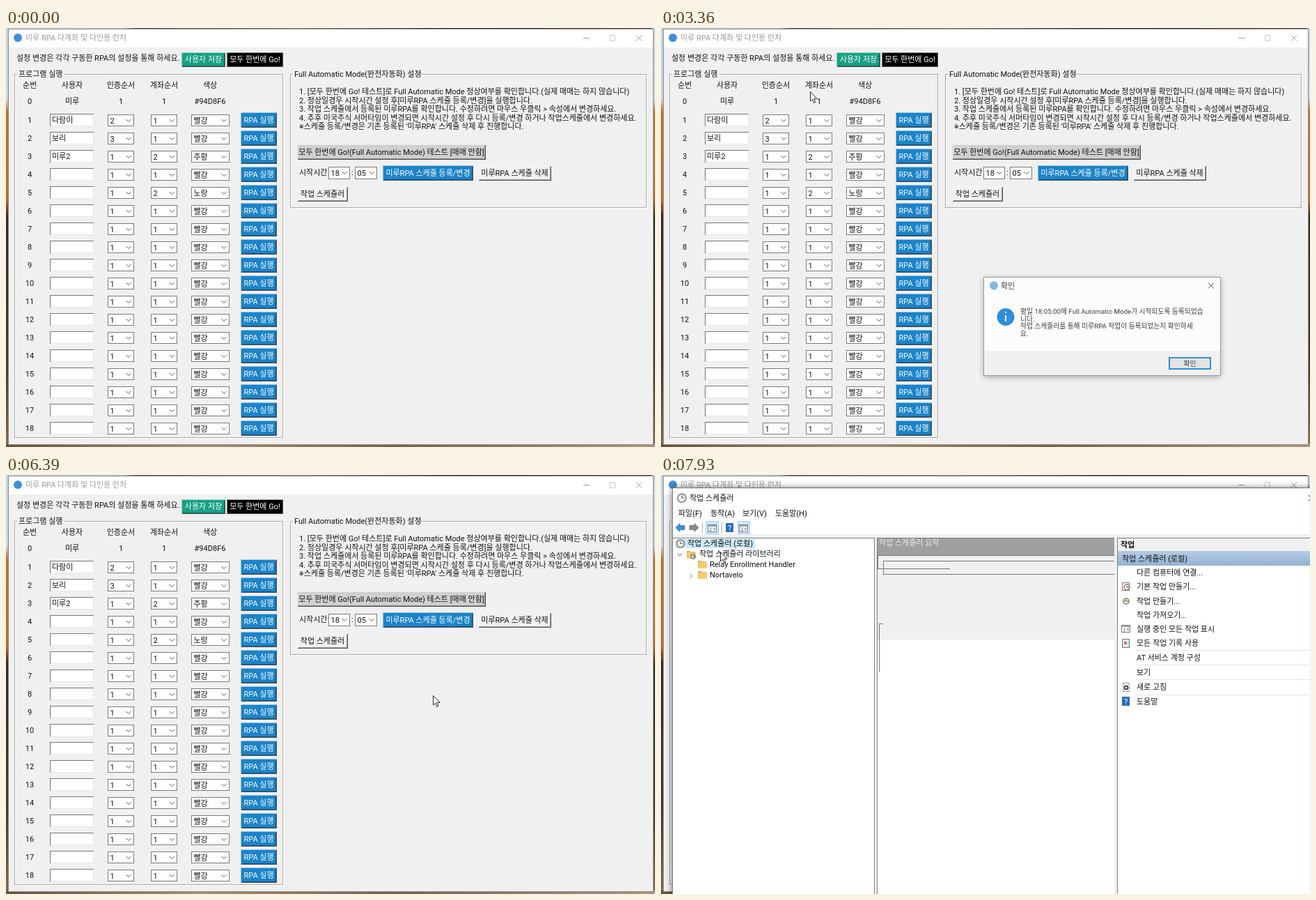
An HTML page that plays this animation: 932 px wide and 601 px high, repeating every 7990 ms.

```html
<!DOCTYPE html>
<html lang="ko">
<head>
<meta charset="utf-8">
<title>런처</title>
<style>
  html, body { margin: 0; width: 100%; height: 100%; overflow: hidden; background: #f0f0f0; }
  svg { display: block; }
  text { font: 11px Roboto, "Noto Sans CJK KR", sans-serif; fill: #111; white-space: pre; }
  rect, .crisp { shape-rendering: crispEdges; }
  #caption text { fill: currentColor; }
  #dialog text { font-size: 9.75px; }
</style>
</head>
<body>
<svg id="stage" width="932" height="601" viewBox="0 0 932 601"></svg>
<script>
const LOOP = 7990;
const BLUE = '#1b84ca', FACE = '#f0f0f0', ACCENT = '#0078d7';

const rect = (x, y, w, h, fill, more = '') => `<rect x="${x}" y="${y}" width="${w}" height="${h}" fill="${fill}" ${more}/>`;
const frame = (x, y, w, h, stroke, fill = 'none') =>
  rect(x + .5, y + .5, w - 1, h - 1, fill, `stroke="${stroke}"`);
const line = (d, stroke = '#444', more = 'class="crisp"') => `<path d="${d}" fill="none" style="stroke:${stroke}" ${more}/>`;
const dot = (x, y, r, fill, more = '') => `<circle cx="${x}" cy="${y}" r="${r}" fill="${fill}" ${more}/>`;
const label = (x, y, s, more = '') => `<text x="${x}" y="${y}" ${more}>${s}</text>`;
const center = (x, y, s, fill = '#111') => label(x, y, s, `text-anchor="middle" style="fill:${fill}"`);
const group = (id, ...parts) => `<g id="${id}">${parts.join('')}</g>`;
const chevron = (x, y) => line(`M${x - 3.5} ${y - 1.5}l3.5 3.5l3.5 -3.5`, '#555', '');
const cross = (x, y, r, stroke) => line(`M${x - r} ${y - r}l${2 * r} ${2 * r}m0 ${-2 * r}l${-2 * r} ${2 * r}`, stroke, '');

function bevel(x, y, w, h, fill, light, dark) {
  const l = x + .5, t = y + .5, r = x + w - .5, b = y + h - .5;
  return rect(x, y, w, h, fill) + line(`M${l} ${b}V${t}H${r}`, light) + line(`M${l} ${b}H${r}V${t}`, dark);
}
function button(x, y, w, h, s, fill = FACE, ink = '#111') {
  return bevel(x, y, w, h, fill, `color-mix(in srgb, ${fill}, white)`, '#555') +
    line(`M${x + 1.5} ${y + h - 1.5}H${x + w - 1.5}V${y + 1.5}`, `color-mix(in srgb, ${fill} 65%, black)`) +
    center(x + w / 2, y + h / 2 + 3.5, s, ink);
}
const combo = (x, y, w, s, h = 17) =>
  frame(x, y - 8, w, h, '#7a7a7a', '#fff') + label(x + 3.5, y + 4.5, s) + chevron(x + w - 8, y + .5);
function fieldset(x, y, w, h, s, gap) {
  return frame(x + 1, y + 1, w, h, '#fff') + frame(x, y, w, h, '#a8a8a8') +
    rect(x + 4, y - 3, gap, 8, FACE) + label(x + 6, y + 4, s);
}
function gradient(id, vertical, ...stops) {
  return `<linearGradient id="${id}" ${vertical ? 'x2="0" y2="1"' : ''}>` +
    stops.map(([o, c]) => `<stop offset="${o}" stop-color="${c}"/>`).join('') + '</linearGradient>';
}

function wallpaper() {
  return gradient('sky', 0, [0, '#c5d8e6'], [.18, '#b4c8d6'], [.2, '#5b4a38'], [.45, '#93866f'], [.7, '#2d2118'], [1, '#6a4a30']) +
    gradient('side', 1, [0, '#bcd3e6'], [.17, '#c9d6dc'], [.2, '#d06a20'], [.41, '#c8641e'], [.45, '#3a2a1c'], [.8, '#4b3826'], [1, '#8a6a48']) +
    gradient('ground', 0, [0, '#6b5138'], [.3, '#a98d6c'], [.6, '#7a6048'], [1, '#b09476']) +
    rect(0, 0, 932, 3, 'url(#sky)') + rect(0, 0, 5, 601, 'url(#side)') +
    rect(928, 0, 4, 601, 'url(#side)') + rect(0, 596, 932, 5, 'url(#ground)');
}

function caption() {
  return group('caption',
    label(28, 18, '미루 RPA 다계좌 및 다인용 런처'),
    line('M829 14.5h9', 'currentColor'),
    frame(867, 10, 8, 9, '#ccc'),
    cross(909, 14.5, 4, 'currentColor'));
}

function userRows() {
  const users = { 1: '다람이', 2: '보리', 3: '미루2' };
  const auth = { 1: 2, 2: 3 }, account = { 3: 2, 5: 2 }, color = { 3: '주황', 5: '노랑' };
  let out = '';
  for (let n = 1; n <= 18; n++) {
    const y = 106 + 26 * n;
    out += center(34, y + 4, n) +
      bevel(63, y - 9, 63, 18, '#fff', '#777', '#e8e8e8') + label(66, y + 4, users[n] || '') +
      combo(146, y, 38, auth[n] || 1) + combo(208, y, 38, account[n] || 1) +
      combo(266, y, 55, color[n] || '빨강') +
      button(337, y - 11, 52, 22, 'RPA 실행', BLUE, '#fff');
  }
  return out;
}

function launcher() {
  const notes = [
    '1. [모두 한번에 Go! 테스트]로 Full Automatic Mode 정상여부를 확인합니다.(실제 매매는 하지 않습니다)',
    '2. 정상일경우 시작시간 설정 후[미루RPA 스케줄 등록/변경]을 실행합니다.',
    '3. 작업 스케줄에서 등록된 미루RPA를 확인합니다. 수정하려면 마우스 우클릭 &gt; 속성에서 변경하세요.',
    '4. 추후 미국주식 서머타임이 변경되면 시작시간 설정 후 다시 등록/변경 하거나 작업스케줄에서 변경하세요.',
    "※스케줄 등록/변경은 기존 등록된 '미루RPA' 스케줄 삭제 후 진행합니다."];
  const columns = [[34, '순번', '0'], [95, '사용자', '미루'], [165, '인증순서', '1'], [227, '계좌순서', '1'], [293, '색상', '#94D8F6']];
  return rect(4, 2, 925, 595, FACE) + rect(4, 2, 925, 26, '#fff') +
    frame(3, 1, 927, 597, '#8a8a8a') +
    dot(17, 14, 6, '#3f8fdc') + caption() +
    label(15, 47, '설정 변경은 각각 구동한 RPA의 설정을 통해 하세요.') +
    button(252, 35, 63, 21, '사용자 저장', '#16a085', '#fff') +
    button(317, 35, 81, 21, '모두 한번에 Go!', '#000', '#fff') +
    fieldset(12, 66, 386, 522, '프로그램 실행', 68) +
    columns.map(([x, head, first]) => center(x, 86, head) + center(x, 109, first)).join('') +
    userRows() +
    group('focus', frame(208, 175, 38, 17, ACCENT), rect(210, 177, 19, 13, ACCENT),
      label(211.5, 188.5, '2', 'style="fill:#fff"')) +
    fieldset(408, 66, 512, 192, 'Full Automatic Mode(완전자동화) 설정', 178) +
    notes.map((s, i) => label(421, 95 + 12.5 * i, s)).join('') +
    button(418, 167, 271, 22, '모두 한번에 Go!(Full Automatic Mode) 테스트 [매매 안함]', '#d0d0d0') +
    label(421, 211, '시작시간') + combo(463, 207, 31, '18', 18) + label(496, 211, ':') + combo(501, 207, 32, '05', 18) +
    button(541, 197, 130, 22, '미루RPA 스케줄 등록/변경', BLUE, '#fff') +
    group('pressed', bevel(541, 197, 130, 22, FACE, '#696969', '#fff'), center(606.5, 212, '미루RPA 스케줄 등록/변경')) +
    button(678, 197, 105, 22, '미루RPA 스케줄 삭제') +
    button(418, 227, 73, 22, '작업 스케줄러');
}

function dialog() {
  const lines = ['평일 18:05:00에 Full Automatic Mode가 시작되도록 등록되었습', '니다.',
    '작업 스케줄러를 통해 미루RPA 작업이 등록되었는지 확인하세', '요.'];
  return group('dialog',
    rect(464, 358, 339, 140, '#fff', 'style="filter:drop-shadow(0 2px 4px #0007)"'),
    rect(464, 463, 339, 35, FACE), frame(463, 357, 341, 142, '#888'),
    dot(478, 369.5, 6, '#6aa9e4'),
    label(488, 373.5, '확인', 'style="font-size:11px"'), cross(790, 369.5, 4, '#222'),
    dot(495, 414.5, 12.5, ACCENT),
    rect(494, 412, 2, 9, '#fff'), rect(494, 407, 2, 2, '#fff'),
    lines.map((s, i) => label(516, 410 + 10.6 * i, s)).join(''),
    rect(730, 473, 59, 16, '#e1e1e1', `stroke="${ACCENT}" stroke-width="2"`),
    center(759.5, 484.5, '확인'));
}

const clock = (x, y, r) => dot(x, y, r, '#f4f1ea', 'stroke="#777" stroke-width="1.5"') + line(`M${x} ${y - r + 2}V${y}h3`, '#555', '');
const folder = (x, y) => rect(x, y, 5, 3, '#d9a93c') + rect(x, y + 1, 12, 9, '#f3cd6b', 'stroke="#dcae4d" stroke-width=".6"');
const help = (x, y) => rect(x, y, 11, 13, '#2a6dbb') + center(x + 5.5, y + 10.5, '?', '#fff');
const paneIcon = (x, y) => frame(x, y, 13, 11, '#777', '#fff') + rect(x + 1, y + 1, 11, 2, '#9ab') +
  line(`M${x + 4.5} ${y + 4}v6m3 -5h3m-3 2h3`, '#678');
const arrow = (x, dir, fill) => `<path d="M${x} 75.5l${6 * dir} -6v3h${7 * dir}v6h${-7 * dir}v3z" fill="${fill}" stroke="#456" stroke-width=".6"/>`;

function actions() {
  const items = [[144, '다른 컴퓨터에 연결...'], [164, '기본 작업 만들기...'], [184.5, '작업 만들기...'], [204.5, '작업 가져오기...'],
    [224.5, '실행 중인 모든 작업 표시'], [245, '모든 작업 기록 사용'], [265.5, 'AT 서비스 계정 구성'], [286.5, '보기'],
    [307.5, '새로 고침'], [328.5, '도움말']];
  return group('actions',
    rect(656, 91, 276, 18, FACE), label(660, 104, '작업', 'style="font-weight:600"'),
    gradient('bar', 1, [0, '#b5cbe3'], [1, '#93b1d2']), rect(656, 109, 276, 21, 'url(#bar)'),
    label(662, 124, '작업 스케줄러 (로컬)'),
    items.map(([y, s]) => label(683, y, s)).join(''),
    [251, 272, 293, 315].map(y => line(`M682 ${y + .5}H932`, '#e4e4e4')).join(''),
    frame(662, 154, 11, 12, '#a66', '#fff'), clock(669, 161, 4),
    clock(668, 181, 4), dot(665, 180, 2, '#e8953a'),
    paneIcon(661, 215),
    frame(662, 235, 11, 13, '#57779b', '#dfe9f5'), rect(665, 239, 4, 4, '#d9823c'),
    frame(663, 298, 10, 13, '#999', '#fff'), dot(668, 305, 2.5, 'none', 'stroke="#222" stroke-width="1.5"'),
    help(662, 318));
}

function scheduler() {
  const menu = [[25, '파일(F)'], [71, '동작(A)'], [117, '보기(V)'], [164, '도움말(H)']];
  return group('scheduler',
    rect(16, 18, 930, 600, '#fff', 'style="filter:drop-shadow(0 0 4px #0008)"'),
    line('M16.5 601V18.5H932', '#777'),
    clock(30, 33, 6), label(41, 37, '작업 스케줄러'), cross(934, 33, 4, '#222'),
    menu.map(([x, s]) => label(x, 59, s)).join(''),
    group('panes',
      rect(17, 85, 915, 6, FACE), rect(306, 90, 5, 511, FACE), rect(651, 90, 5, 511, FACE),
      line('M17 90.5H306.5V601M310.5 601V90.5H651M655.5 601V90.5H932', '#7d7d7d'),
      rect(311, 91, 340, 24, '#9f9f9f'), label(313, 101, '작업 스케줄러 요약', 'style="fill:#eee"'),
      rect(311, 115, 340, 121, FACE), line('M311 115.5H651', '#777')),
    actions(),
    group('tree',
      arrow(21, 1, '#2f93dd'), arrow(54, -1, '#8a8a8a'),
      line('M59.5 68v15M87.5 68v15', '#aaa'),
      frame(64, 66, 19, 19, '#99d1ff', '#cce8ff'), paneIcon(67, 71),
      help(93, 69),
      frame(110, 66, 18, 19, '#99d1ff', '#cce8ff'), paneIcon(112, 71),
      rect(21, 92, 114, 13, '#cce8ff'), clock(28, 98.5, 5.5), label(38, 102, '작업 스케줄러 (로컬)'),
      chevron(27, 114), folder(37, 109), clock(46, 117, 3), label(55, 117, '작업 스케줄러 라이브러리'),
      folder(53, 123), label(70, 132, 'Relay Enrollment Handler'),
      line('M41.5 141.5l3.5 3.5l-3.5 3.5', '#888', ''), folder(53, 138), label(70, 147, 'Nortavelo')),
    group('summary',
      line('M651 123.5H319.5V142.5H651M311.5 116V134.5H415M319 213.5H313.5V283', '#777')));
}

const stage = document.getElementById('stage');
stage.innerHTML = wallpaper() + launcher() + dialog() + group('veil', rect(0, 0, 932, 601, '#fff')) + scheduler() +
  group('cursor', '<path d="M.5 .5V14L3.6 11.2L5.7 16.2L7.8 15.3L5.7 10.4H10Z" fill="#fff" stroke="#111" stroke-width=".9"/>');
const part = id => document.getElementById(id);
const show = (id, on) => part(id).style.display = on ? '' : 'none';

// time, x, y
const route = [[340, 897, 595], [950, 610, 214], [1830, 610, 214], [1950, 395, 10], [2020, 237, 80],
  [2440, 237, 80], [2760, 424, 207], [3030, 153, 31], [3290, 153, 31], [3360, 214, 91], [3430, 214, 91],
  [3970, 620, 383], [4040, 620, 383], [4600, 780, 466], [4800, 757, 479], [5610, 757, 479], [5860, 609, 320],
  [6200, 609, 320], [6520, 616, 314], [6790, 616, 314], [6860, 607, 320], [7200, 607, 320], [7790, 96, 122],
  [7860, 90, 116], [7930, 85, 110]];
const opening = [[3250, 0], [3360, .8], [3430, .92], [3500, 1], [5220, 1], [5330, .27], [5390, 0]];
const fading = [[7000, 0], [7120, .5], [7230, 1]];

function sample(keys, t, column = 1) {
  const i = keys.findIndex(k => k[0] > t);
  if (i === 0) return keys[0][column];
  if (i < 0) return keys[keys.length - 1][column];
  const a = keys[i - 1], b = keys[i];
  return a[column] + (b[column] - a[column]) * (t - a[0]) / (b[0] - a[0]);
}

function draw() {
  const t = performance.now() % LOOP;
  const active = (t >= 1150 && t < 3180) || (t >= 5260 && t < 6200);
  part('caption').style.color = active ? '#000' : '#999';
  show('focus', active);
  show('pressed', t >= 1150 && t < 3180);

  const alpha = sample(opening, t);
  const scale = t > 5000 ? .968 + .032 * alpha : .975 + .025 * Math.min(1, alpha / .8);
  show('dialog', alpha > 0);
  part('dialog').setAttribute('opacity', alpha);
  part('dialog').setAttribute('transform', `translate(633.5 428) scale(${scale}) translate(-633.5 -428)`);

  show('veil', t >= 7060 && t < 7330);
  part('veil').setAttribute('opacity', sample(fading, t));
  show('scheduler', t >= 7330);
  show('panes', t >= 7600);
  show('actions', t >= 7720);
  show('tree', t >= 7860);
  show('summary', t >= 7930);

  show('cursor', t >= 340);
  part('cursor').setAttribute('transform', `translate(${Math.round(sample(route, t))} ${Math.round(sample(route, t, 2))})`);
  requestAnimationFrame(draw);
}
draw();
</script>
</body>
</html>
```
